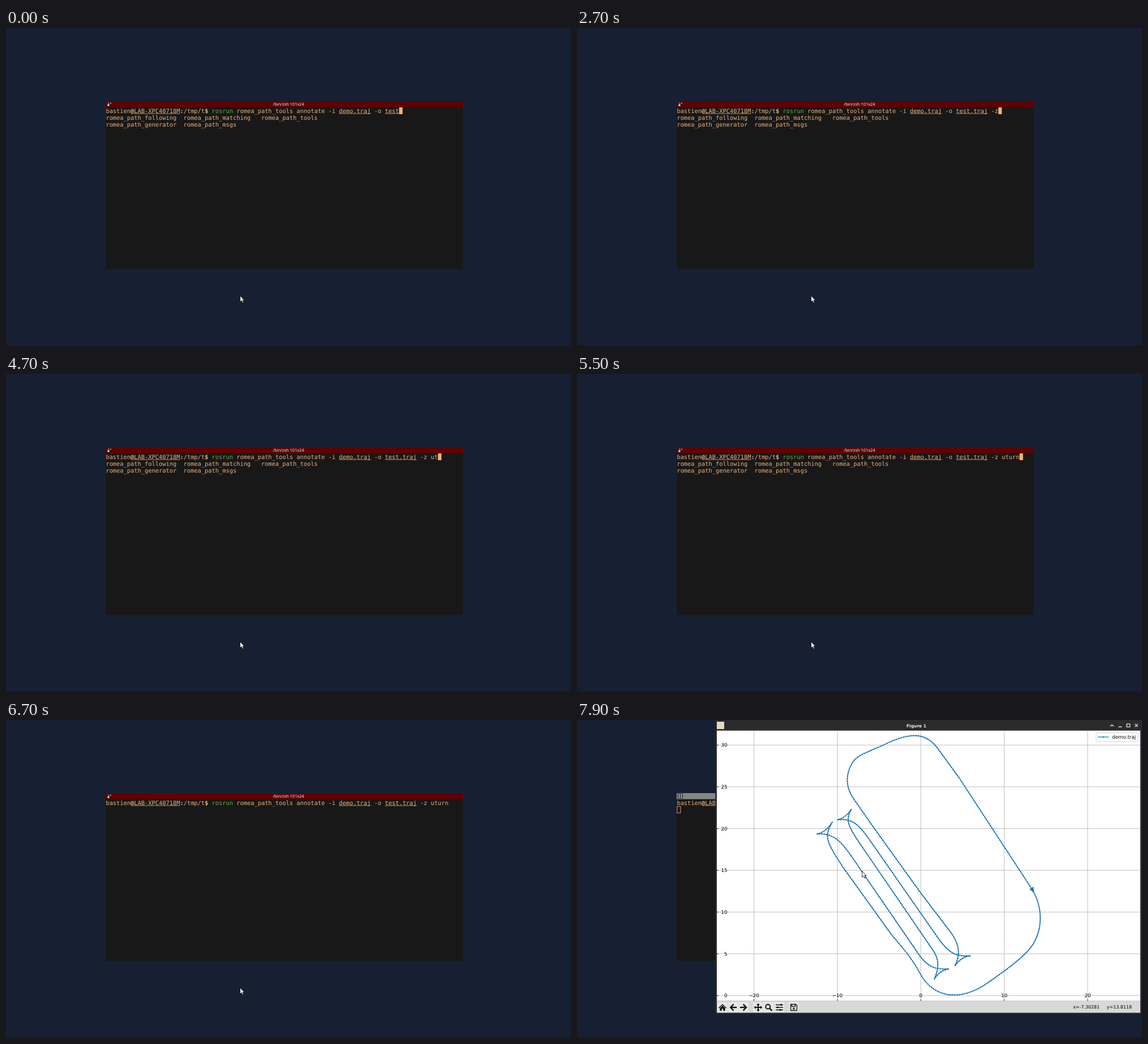
These frames come from a looping animation (998x561 px, 8 s). An HTML page:

```html
<!DOCTYPE html>
<html lang="en">
<head>
<meta charset="utf-8">
<title>Annotating a path</title>
<style>
  html, body { margin: 0; width: 100%; height: 100%; overflow: hidden; background: #172033; }
  svg { display: block; width: 998px; height: 561px; }
  text { white-space: pre; text-rendering: geometricPrecision; }
  .term { font: 10.365px "DejaVu Sans Mono", monospace; fill: #ebb37d; }
  .plot { font: 8.67px "DejaVu Sans", sans-serif; fill: #000; }
  .bold { font-weight: bold; }
  .cmd { fill: #5bb23c; }
  .tan { fill: #ebb37d; }
  .blue { fill: none; stroke: #1f77b4; stroke-width: 1.35; }
  .dots { fill: none; stroke: #1f77b4; stroke-width: 2.5; stroke-linecap: round; stroke-dasharray: 0 4.4; }
</style>
</head>
<body>
<svg viewBox="0 0 998 561" xmlns="http://www.w3.org/2000/svg">
  <rect width="998" height="561" fill="#172033"/>
  <rect y="560" width="998" height="1" fill="#0f1521"/>

  <g id="terminal">
    <rect x="176" y="129" width="631" height="296" fill="#181818"/>
    <rect id="bar" x="176" y="129" width="631" height="10.7" fill="#600000"/>
    <g id="iconOn">
      <rect x="179" y="131" width="7.5" height="7" fill="#281818"/>
      <rect x="179.5" y="134.5" width="3" height="3" fill="#eee"/>
      <path d="M180 131.5h2v2h-2zM183.5 131.5h2.5v2.5h-2.5z" fill="#8a8080"/>
    </g>
    <path id="iconOff" d="M178.5 130.5h8v7.5h-8zM182.5 130.5v7.5M178.5 134.3h8" fill="#aaa" stroke="#222" stroke-width="1"/>
    <text x="499" y="137" text-anchor="middle" fill="#f4eeee" style="font:7.38px 'Noto Sans',sans-serif">/bin/zsh 101x24</text>
    <text class="term" x="176.4" y="149.7">bastien<tspan class="bold">@</tspan>LAB-XPC40718M<tspan class="bold">:</tspan>/tmp/t<tspan class="bold">$</tspan> <tspan class="cmd">rosrun</tspan> romea_path_tools annotate -i demo.traj -o test<tspan id="typed"></tspan></text>
    <g id="lines" class="tan"></g>
    <g id="list" class="term">
      <text x="176.4" y="161.6">romea_path_following  romea_path_matching   romea_path_tools</text>
      <text x="176.4" y="173.5">romea_path_generator  romea_path_msgs</text>
    </g>
    <rect id="caret" class="tan" y="140.1" width="6.2" height="11.9"/>
    <rect id="hollow" x="176.9" y="152.5" width="6" height="11.4" fill="none" stroke="#ebb37d" stroke-width=".9"/>
  </g>

  <g id="figure">
    <rect x="244.3" width="753.7" height="518" fill="#2b2b2b"/>
    <rect x="247" y="3" width="13" height="13" fill="#e6d8c4"/>
    <text x="599.5" y="12.5" text-anchor="middle" fill="#eee" style="font:bold 7.5px 'DejaVu Sans',sans-serif">Figure 1</text>
    <g fill="none" stroke="#e4e4e4" stroke-width="1.3">
      <path d="M942 11.3l3-3 3 3M956.5 12h6M985.5 7l5 5M990.5 7l-5 5"/>
      <rect x="971" y="7" width="5.6" height="5.2"/>
    </g>
    <rect x="247" y="18.7" width="748" height="477" fill="#fff"/>
    <rect x="247" y="495.5" width="748" height="21" fill="#d8d8d8"/>
    <path id="grid" stroke="#b0b0b0" stroke-width=".8"/>
    <path id="ticks" stroke="#000" stroke-width=".8"/>
    <g id="labels" class="plot"></g>
    <path id="track" class="blue" stroke-linejoin="round" d="M668 433
      C676 415 677 400 662 377 L607 305 525 191 490 141
      C474 119 474 97 486 76 C495 61 512 58 550 40 C590 22 616 22 637 50
      L675 102 804 299
      C823 330 824 372 801 402 C785 422 752 445 725 464 C685 492 635 497 607 449
      C592 420 575 402 555 378 L470 260
      C440 214 436 206 451 180 C443 192 435 199 424 201 C452 199 466 212 490 248
      L602 411
      C618 435 632 441 657 439 C645 441 638 447 631 457 C640 437 640 422 628 405
      L497 214
      C476 183 475 174 485 157 C479 166 471 174 460 176 C487 173 498 184 520 216
      L638 385
      C656 410 668 418 695 416 C684 417 676 422 668 433Z"/>
    <path id="dots" class="dots"/>
    <path d="M807.3 305.3L799.3 298.5 806.3 294Z" fill="#1f77b4"/>
    <rect x="917" y="22.6" width="74" height="15.4" rx="2" fill="#fff" fill-opacity=".85" stroke="#ccc" stroke-width=".8"/>
    <path class="blue" d="M920 30h19"/>
    <circle cx="929.5" cy="30" r="1.3" fill="#1f77b4"/>
    <text class="plot" x="945.3" y="32.8">demo.traj</text>

    <g id="buttons" fill="#e8e8e8"></g>
    <g fill="#111">
      <path d="M250 507.5l7-6.5 7 6.5-1 1-6-5.4-6 5.4zM252.3 508.3l4.7-4.2 4.7 4.2v4.7h-3.4v-3.5h-2.6v3.5h-3.4z"/>
      <path id="arrow" d="M269.5 507l6.3-6.4 1.6 1.6-3.4 3.5h8.2v2.6H274l3.4 3.5-1.6 1.6z"/>
      <use href="#arrow" transform="translate(570.2 0) scale(-1 1)"/>
      <path d="M320 499.7l3 3.2h-2v3.1h3.1v-2l3.2 3-3.2 3v-2H321v3.1h2l-3 3.2-3-3.2h2V508h-3.1v2l-3.2-3 3.2-3v2h3.1v-3.1h-2z"/>
    </g>
    <g fill="none" stroke="#111">
      <circle cx="337.3" cy="505.7" r="4" stroke-width="2"/>
      <path d="M340.4 508.8l4 4" stroke-width="2.5"/>
      <path d="M351 502.5h13M351 507h13M351 511.5h13" stroke-width="1.3"/>
      <path d="M360.5 501v3M354.5 505.5v3M359 510v3" stroke-width="2.4"/>
      <path d="M377.5 501.5h9l2 2v9h-11zM379.5 502v3.4h6v-3.4" stroke-width="1.4"/>
      <circle cx="383" cy="509" r="1.3" stroke-width="1.2"/>
    </g>
    <text id="coords" x="980" y="509" text-anchor="end" style="font:7.95px 'DejaVu Sans',sans-serif"></text>
  </g>

  <path id="pointer" d="M0 0V11L2.5 8.7 4.3 12.7 6.1 11.9 4.4 8H7.4Z" fill="#fff" stroke="#000" stroke-width=".8"/>
</svg>

<script>
const LOOP = 8000, CELL = 6.24, LEFT = 176.4;
const ENTER = 6100, OPEN = 6800;
const $ = id => document.getElementById(id);
const NS = "http://www.w3.org/2000/svg";

// [time, character]
const keys = [
  [300, "."], [700, "t"], [800, "r"], [900, "a"], [1100, "j"], [1700, " "],
  [2300, "-"], [2700, "z"], [2900, " "],
  [4600, "u"], [4700, "t"], [4800, "u"], [5000, "r"], [5300, "n"]
];
const blinks = [[3500, 4100], [5900, ENTER], [6700, OPEN]];

// [time, x, y, readout]
const moves = [
  [0, 413.5, 472.3, ""],
  [7700, 440, 402, "x=-11.9824     y=6.82301"],
  [7800, 486, 307, "x=-9.40271     y=10.4856"],
  [7900, 503.7, 266.5, "x=-7.30281     y=13.8118"]
];

function add(parent, tag, attrs, text) {
  const el = document.createElementNS(NS, tag);
  for (const k in attrs) el.setAttribute(k, attrs[k]);
  if (text) el.textContent = text;
  return $(parent).appendChild(el);
}

const underline = (col, len) => add("lines", "rect",
  { x: LEFT + col * CELL, y: 150.6, width: len * CELL, height: 0.8 });
underline(8, 13);
underline(66, 9);
const fileLine = underline(79, 4);

let grid = "", ticks = "";
for (let v = -20; v <= 20; v += 10) {
  const x = 607.3 + v * 14.735;
  grid += `M${x} 18.7V495.5`;
  ticks += `M${x} 492.5V495.5`;
  add("labels", "text", { x, y: 489.3, "text-anchor": "middle" }, String(v).replace("-", "\u2212"));
}
for (let v = 0; v <= 30; v += 5) {
  const y = 486.2 - v * 14.733;
  grid += `M247 ${y}H995`;
  ticks += `M247 ${y}H250`;
  add("labels", "text", { x: 265.5, y: y + 3.2, "text-anchor": "end" }, String(v));
}
$("grid").setAttribute("d", grid);
$("ticks").setAttribute("d", ticks);
$("dots").setAttribute("d", $("track").getAttribute("d"));

for (const x of [257, 276, 294.3, 320, 338.5, 357.2, 383])
  add("buttons", "rect", { x: x - 8.7, y: 498, width: 17.4, height: 17 });

const show = (id, on) => $(id).setAttribute("visibility", on ? "visible" : "hidden");

function draw(t) {
  const typed = keys.filter(k => k[0] <= t).map(k => k[1]).join("");
  const entered = t >= ENTER, open = t >= OPEN;
  $("typed").textContent = typed;
  fileLine.setAttribute("width", (4 + Math.min(typed.length, 5)) * CELL);

  $("caret").setAttribute("x", LEFT + (entered ? 0 : 83 + typed.length) * CELL);
  $("caret").setAttribute("y", entered ? 152 : 140.1);
  show("caret", !open && !blinks.some(([a, b]) => t >= a && t < b));
  show("list", !entered);

  show("figure", open);
  show("hollow", open);
  show("iconOn", !open);
  show("iconOff", open);
  $("bar").setAttribute("fill", open ? "#858585" : "#600000");

  const [, x, y, readout] = moves.filter(m => m[0] <= t).pop();
  $("pointer").setAttribute("transform", `translate(${x} ${y})`);
  $("coords").textContent = readout;
}

function tick() {
  draw(performance.now() % LOOP);
  requestAnimationFrame(tick);
}
tick();
</script>
</body>
</html>
```
